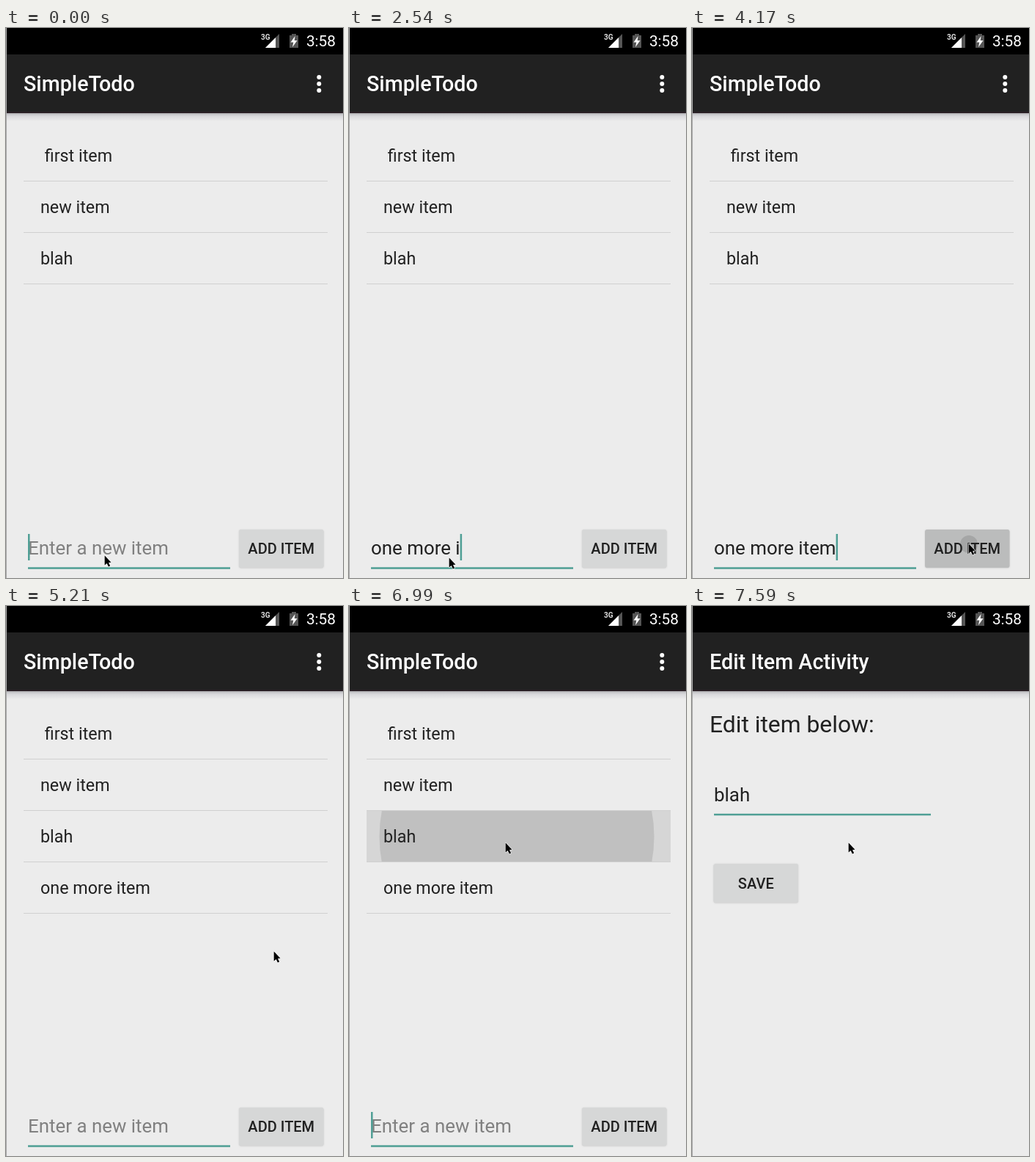
An HTML page with a canvas for the animation above (8 s loop, 460x749 px).

```html
<!DOCTYPE html>
<html lang="en">
<head>
<meta charset="utf-8">
<title>Todo list</title>
<style>
html, body { margin: 0; width: 100%; height: 100%; overflow: hidden; background: #ececec; }
canvas { display: block; width: 460px; height: 749px; }
</style>
</head>
<body>
<canvas id="stage" width="460" height="749"></canvas>
<script>
const ctx = document.getElementById('stage').getContext('2d');
const FONT = 'Roboto, sans-serif';
const TEAL = '#4f9f95', INK = '#212121', PAGE = '#ececec', GREY = '#d6d7d7';
const DRAFT = 'one more item';

const LOOP = 8000, STEP = 148.69;
const TYPE = 10, TYPED = 19, PRESS = 28, ADDED = 31, TAP = 46, OPEN = 48;
const BLINK = 3.2;

const START = { x: 137, y: 722 }, BUTTON = { x: 378, y: 703 };
const REST = { x: 366, y: 471 }, ROW = { x: 214, y: 323 };

const progress = (k, a, b) => Math.min(1, Math.max(0, (k - a) / (b - a)));
const mix = (a, b, p) => a + (b - a) * p;
const ease = p => p * p * (3 - 2 * p);

// Two bursts of typing with a short pause between the words.
function typedCount(k) {
  if (k < TYPE || k >= ADDED) return 0;
  return Math.round(k < 17 ? mix(1, 9, progress(k, TYPE, 15)) : mix(10, 13, progress(k, 17, TYPED)));
}

// The caret restarts its blink after each edit.
function caretOn(k) {
  const edit = k > TAP ? TAP + 1 : k >= ADDED ? ADDED : k >= TYPE ? Math.min(k, TYPED) : -2.7;
  return Math.floor((k - edit) / BLINK) % 2 === 0;
}

function glide(k, a, b, from, to, bow) {
  const p = ease(progress(k, a, b));
  return { x: mix(from.x, to.x, p), y: mix(from.y, to.y, p) + bow * Math.sin(Math.PI * p) };
}

function pointer(k) {
  if (k < 20) return glide(k, 0, 1, { x: 135, y: 719 }, START, 0);
  if (k < ADDED) return glide(k, 20, 26, START, BUTTON, 22);
  if (k < 35) return glide(k, ADDED, 34, BUTTON, REST, 0);
  return glide(k, 35, 42, REST, ROW, 15);
}

function rect(x, y, w, h, color) {
  ctx.fillStyle = color;
  ctx.fillRect(x, y, w, h);
}

function disc(x, y, r, color) {
  ctx.fillStyle = color;
  ctx.beginPath();
  ctx.arc(x, y, r, 0, 7);
  ctx.fill();
}

function poly(points, color) {
  ctx.fillStyle = color;
  ctx.beginPath();
  points.forEach(([x, y]) => ctx.lineTo(x, y));
  ctx.closePath();
  ctx.fill();
}

function text(str, x, y, size, color = INK, weight = 400, align = 'left') {
  ctx.font = `${weight} ${size}px ${FONT}`;
  ctx.textAlign = align;
  ctx.fillStyle = color;
  ctx.fillText(str, x, y);
}

function clipped(x, y, w, h, draw) {
  ctx.save();
  ctx.beginPath();
  ctx.rect(x, y, w, h);
  ctx.clip();
  draw();
  ctx.restore();
}

function button(label, x, y, w, h, color, ripple) {
  ctx.save();
  ctx.shadowColor = 'rgba(0,0,0,.16)';
  ctx.shadowBlur = 2;
  ctx.shadowOffsetY = 0.5;
  ctx.fillStyle = color;
  ctx.beginPath();
  ctx.roundRect(x, y, w, h, 3);
  ctx.fill();
  ctx.restore();
  if (ripple) clipped(x, y, w, h, ripple);
  text(label, x + w / 2, y + h / 2 + 7, 20, INK, 500, 'center');
}

function field(str, hint, baseline, width, caret) {
  text(str || hint, 30, baseline, 25.9, str ? INK : '#808080');
  const end = 30 + (str ? ctx.measureText(str).width : 0);
  if (caret) rect(end, baseline - 28, 2.5, 36, TEAL);
  rect(30, baseline + 17.3, width, 2.5, TEAL);
}

function header(title) {
  const fade = ctx.createLinearGradient(0, 116, 0, 127);
  fade.addColorStop(0, '#b4b4b7');
  fade.addColorStop(0.35, '#d8d8db');
  fade.addColorStop(1, PAGE);
  rect(0, 116, 460, 11, fade);
  rect(0, 36, 460, 80, INK);
  rect(0, 114, 460, 2, '#2a2026');
  text(title, 24, 86, 28.7, '#fff', 500);
}

function statusBar() {
  rect(0, 0, 460, 36, '#000');
  text('3G', 348, 16, 10, '#ddd', 700);
  poly([[354, 27], [373, 27], [373, 8]], '#555');
  poly([[354, 27], [368, 27], [368, 13]], '#fff');
  rect(390, 8, 6, 2, '#555');
  rect(387, 10, 12, 17, '#555');
  poly([[394.5, 11], [388.5, 19.5], [392.3, 19.5], [391, 26], [397.5, 17], [393.7, 17]], '#fff');
  text('3:58', 450, 25, 20.8, '#fff', 400, 'right');
}

function rowRipple(k) {
  const p = progress(k, TAP, TAP + 1);
  clipped(24, 278, 415, 71, () => {
    rect(24, 278, 415, 71, '#d6d6d6');
    disc(mix(216, 229, p), mix(326, 314, p), mix(42, 187.5, p), '#c0c0c0');
  });
}

function listPage(k) {
  rect(0, 0, 460, 749, PAGE);
  header('SimpleTodo');
  for (let i = -1; i <= 1; i++) disc(427.3, 76 + 9 * i, 3, '#fff');
  if (k >= TAP) rowRipple(k);

  const items = [' first item', 'new item', 'blah'];
  if (k >= ADDED) items.push(DRAFT);
  items.forEach((item, i) => {
    text(item, 47, 182 + 70 * i, 23.3);
    rect(24, 208 + 70 * i, 415, 1, '#d0d0d0');
  });

  field(DRAFT.slice(0, typedCount(k)), 'Enter a new item', 717, 276, caretOn(k));

  const held = k >= PRESS && k < ADDED;
  const ripple = held && (() => disc(BUTTON.x, BUTTON.y, 12 + 45 * (k - PRESS), '#a5a6a6'));
  button('ADD ITEM', 318, 683, 115.5, 52, held ? '#bbbcbc' : GREY, ripple);
}

function editPage(k) {
  rect(0, 0, 460, 749, PAGE);
  header('Edit Item Activity');
  text('Edit item below:', 24, 172, 31.8);
  field('blah', '', 265.5, 296, caretOn(k));
  button('SAVE', 29.5, 351, 115.5, 53, GREY);
}

function arrow({ x, y }) {
  ctx.save();
  ctx.translate(x - 0.3, y - 0.5);
  ctx.strokeStyle = 'rgba(255,255,255,.8)';
  ctx.lineWidth = 1.4;
  ctx.lineJoin = 'round';
  poly([[0, 0], [0, 13], [3, 10.4], [5.2, 15], [7.4, 14], [5.3, 9.5], [8.8, 9.2]], '#000');
  ctx.stroke();
  ctx.fill();
  ctx.restore();
}

function draw(time) {
  const k = Math.floor((time % LOOP) / STEP);
  if (k < OPEN) {
    listPage(k);
  } else {
    // The new page settles upwards as it opens.
    const rise = 6 * (1 - progress(k, OPEN, OPEN + 1));
    ctx.save();
    ctx.translate(0, rise);
    editPage(k);
    ctx.restore();
    rect(0, 36, 460, rise, INK);
  }
  statusBar();
  rect(0, 0, 1, 749, '#a9a9a9');
  arrow(pointer(k));
}

const start = performance.now();
function tick() {
  draw(performance.now() - start);
  requestAnimationFrame(tick);
}
tick();
</script>
</body>
</html>
```
